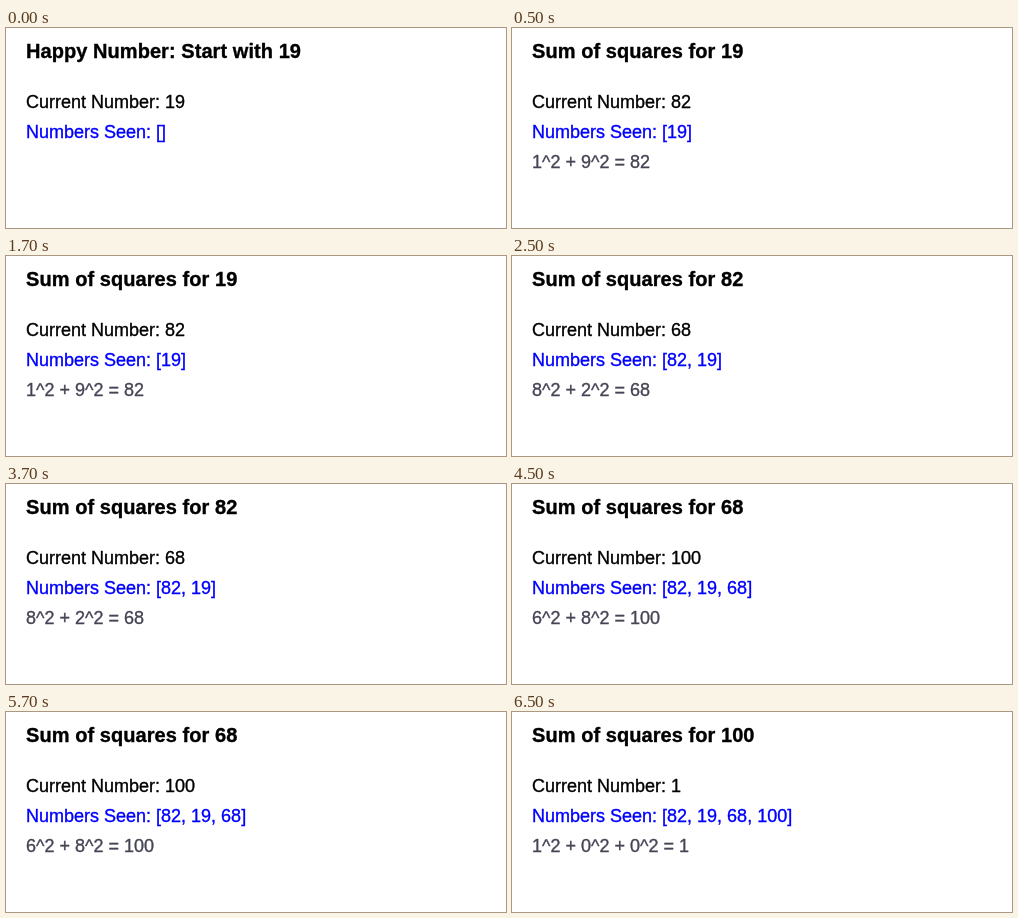
An HTML page with a canvas that plays this animation: 500x200 px, repeating every 8000 ms.

```html
<!DOCTYPE html>
<html lang="en">
<head>
<meta charset="utf-8">
<title>Happy Number</title>
<style>
  html, body { margin: 0; width: 100%; height: 100%; overflow: hidden; background: #fff; }
  canvas { display: block; }
</style>
</head>
<body>
<canvas id="stage" width="500" height="200"></canvas>
<script>
const LOOP = 8000, INTRO = 500, STEP = 2000, START = 19;
const FAMILY = '"Liberation Sans", Arial, sans-serif';
const ctx = document.getElementById('stage').getContext('2d', { alpha: false });
ctx.lineWidth = 0.35;
ctx.lineJoin = 'round';

// A hairline outline gives the text its slightly heavier weight.
function write(text, y, color, font = '18px', spacing = '0px') {
  ctx.font = `${font} ${FAMILY}`;
  ctx.letterSpacing = spacing;
  ctx.fillStyle = ctx.strokeStyle = color;
  ctx.fillText(text, 20, y);
  ctx.strokeText(text, 20, y);
}

// State after a number of steps; seen numbers are listed in hash order (n mod 8).
function stateAt(steps) {
  let current = START, title = `Happy Number: Start with ${START}`, sum = '';
  const seen = [];
  for (let i = 0; i < steps; i++) {
    const digits = [...String(current)];
    title = `Sum of squares for ${current}`;
    seen.push(current);
    current = digits.reduce((total, d) => total + d * d, 0);
    sum = `${digits.map(d => d + '^2').join(' + ')} = ${current}`;
  }
  seen.sort((a, b) => a % 8 - b % 8);
  return { title, current, seen, sum };
}

let shown = -1;
function frame() {
  const t = performance.now() % LOOP;
  const steps = t < INTRO ? 0 : 1 + Math.floor((t - INTRO) / STEP);
  if (steps !== shown) {
    shown = steps;
    const s = stateAt(steps);
    ctx.fillStyle = '#fff';
    ctx.fillRect(0, 0, 500, 200);
    write(s.title, 30, '#000', 'bold 20px', '0.06px');
    write(`Current Number: ${s.current}`, 80, '#000');
    write(`Numbers Seen: [${s.seen.join(', ')}]`, 110, '#00f');
    write(s.sum, 140, '#445');
  }
  requestAnimationFrame(frame);
}
frame();
</script>
</body>
</html>
```
